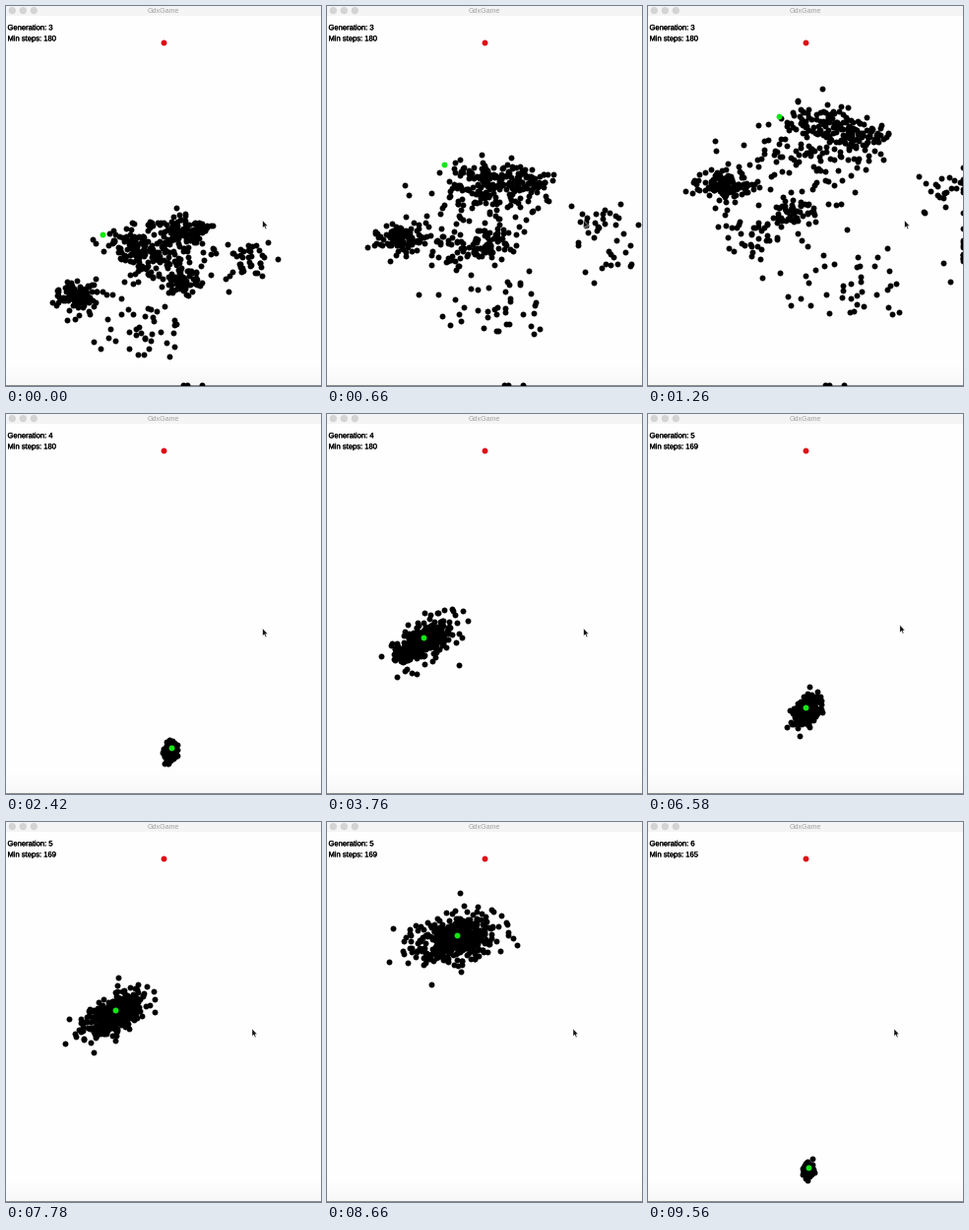
These frames come from a looping animation (320x386 px, 9580 ms). A matplotlib script:

```python
import numpy as np
import matplotlib.pyplot as plt
import matplotlib.patheffects as pe
from matplotlib.animation import FuncAnimation
from matplotlib.patches import Circle, Polygon, Rectangle

W, H, DPI = 320, 386, 100
STEP, FRAMES = 20, 479
START, GOAL = (160, 360), (160, 37)
PX = 72 / DPI


def spline(rows):
    """Smooth curve through rows of (time, x, y)."""
    rows = np.array(rows, float)
    t, v = rows[:, 0], rows[:, 1:]
    m = np.gradient(v, t, axis=0)

    def at(x):
        x = np.clip(x, t[0], t[-1])
        i = min(np.searchsorted(t, x, side="right") - 1, len(t) - 2)
        h = t[i + 1] - t[i]
        u = (x - t[i]) / h
        return ((1 + 2 * u) * (1 - u) ** 2 * v[i] + u * (1 - u) ** 2 * h * m[i]
                + u * u * (3 - 2 * u) * v[i + 1] + u * u * (u - 1) * h * m[i + 1])
    return at


# Route of the leading dot, by age of its generation in ms
best = spline([(0, *START), (220, 163, 350.5), (320, 168, 338.5),
               (800, 158, 295), (1610, 98, 232), (1660, 98, 227),
               (1960, 111, 191), (2870, 133, 112), (3300, 156.7, 67.7),
               (3700, 160, 41)])


def in_window(pts):
    return np.clip(pts, (3, 13), (319.5, 384.5))


class Swarm:
    """Mutated copies that drift away from the leading dot as they age."""

    def __init__(self, seed, n=560, strays=()):
        rng = np.random.default_rng(seed)
        self.z = rng.normal(size=(n, 2)) * rng.uniform(.3, 1.6, (n, 1))
        self.phase = rng.uniform(0, 2 * np.pi, (n, 2))
        self.rate = rng.uniform(.001, .003, (n, 2))
        self.strays = np.reshape(strays, (-1, 2))

    def dots(self, age):
        sx = .0068 * age
        sy = 11 * (1 - np.exp(-age / 1000))
        tilt = -.6 * np.sin(np.pi * min(age / 3300, 1))
        zx, zy = (self.z + .2 * np.sin(self.phase + self.rate * age)).T
        cloud = np.column_stack([sx * zx, sy * (tilt * zx + np.sqrt(1 - tilt ** 2) * zy)])
        strays = self.strays * (age / 3300) ** 1.8
        return in_window(best(max(age - 35, 0)) + np.vstack([cloud, strays]))


class Families:
    """Early population: several families, each on its own straight course."""

    # count, size, centre at age 1610, centre at age 2870
    COURSES = [
        (115, 8, 72, 294, 77, 181),
        (80, 9, 183, 228, 212, 132),
        (65, 11, 128, 240, 178, 112),
        (60, 9, 179, 277, 145, 208),
        (110, 20, 162, 250, 165, 152),
        (35, 10, 145, 260, 102, 235),
        (26, 12, 238, 254, 296, 186),
        (14, 9, 250, 265, 335, 250),
        (44, 24, 135, 324, 200, 280),
    ]

    def __init__(self, seed):
        rng = np.random.default_rng(seed)
        rows = np.repeat(self.COURSES, [c[0] for c in self.COURSES], axis=0)
        self.a, self.b = rows[:, 2:4], rows[:, 4:6]
        self.z = rng.normal(size=self.a.shape) * rows[:, 1:2]
        self.phase = rng.uniform(0, 2 * np.pi, self.a.shape)
        self.stuck = [(x, 384.5) for x in (180, 184, 199)]

    def dots(self, age):
        u = (age - 1610) / 1260
        grow = np.array([1.2 + .45 * u, .85 + .15 * u])
        pts = self.a + (self.b - self.a) * u + self.z * grow
        pts += 2.5 * np.sin(self.phase + age * .003)
        return np.vstack([in_window(pts), self.stuck])


# Birth time, number, min steps, population
GENERATIONS = [
    (-1610, 3, 180, Families(3)),
    (2100, 4, 180, Swarm(4, strays=[(32, 71), (125, 86), (-110, 8), (-92, 9), (-57, 56)])),
    (5820, 5, 169, Swarm(5)),
    (9340, 6, 165, Swarm(6)),
]

fig = plt.figure(figsize=(W / DPI, H / DPI), dpi=DPI, facecolor="#fefefe")
ax = fig.add_axes([0, 0, 1, 1])

# Window
shade = np.linspace(.995, .965, 24)[:, None]
ax.imshow(shade, cmap="gray", vmin=0, vmax=1, extent=(0, W, H, 362),
          aspect="auto", zorder=0)
ax.add_patch(Rectangle((0, 0), W, 10, color="#f4f4f4", lw=0))
ax.add_patch(Rectangle((0, 9.6), W, .8, color="#d6d6d6", lw=0))
ax.add_patch(Rectangle((0, 385), W, 1, color="#8c8c8c", lw=0))
for x in (6.3, 17.3, 28.3):
    ax.add_patch(Circle((x, 4.6), 3.3, fc="#d4d4d4", ec="#c6c6c6", lw=.3))
ax.text(160, 7.2, "GdxGame", family="Liberation Sans", size=7.15 * PX,
        color="#a2a2a2", ha="center", va="baseline")


def label(y):
    t = ax.text(1.5, y, "", family="Liberation Sans", size=7.6 * PX,
                color="black", va="baseline")
    t.set_path_effects([pe.withStroke(linewidth=.2, foreground="black")])
    return t


def dot_layer(color, z):
    return ax.scatter([], [], s=(5.9 * PX) ** 2, c=color, lw=0, zorder=z)


gen_text, step_text = label(24.3), label(35.4)
goal, crowd, lead = (dot_layer(c, z) for z, c in
                     enumerate(("#e00a14", "black", "#14e614"), 3))
goal.set_offsets([GOAL])

ARROW = np.array([(0, 0), (0, 7.6), (1.7, 6.1), (2.9, 8.9), (4.1, 8.4),
                  (2.9, 5.7), (5.2, 5.6)])
cursor = Polygon(ARROW, fc="#111111", ec="white", lw=.3, zorder=6)
ax.add_patch(cursor)
mouse = spline([(6400, 260.7, 217.8), (6800, 250, 210)])

ax.set_xlim(0, W)
ax.set_ylim(H, 0)
ax.axis("off")


def update(i):
    now = i * STEP
    k = max(j for j, g in enumerate(GENERATIONS) if g[0] <= now)
    born, number, steps, pop = GENERATIONS[k]
    age = now - born
    if k + 1 < len(GENERATIONS):  # short hold before the next generation
        age = min(age, GENERATIONS[k + 1][0] - born - 40)
    gen_text.set_text(f"Generation: {number}")
    step_text.set_text(f"Min steps: {steps}")
    crowd.set_offsets(pop.dots(age))
    lead.set_offsets([best(age)])
    cursor.set_xy(ARROW + mouse(now))
    return crowd, lead, gen_text, step_text, cursor


anim = FuncAnimation(fig, update, frames=FRAMES, interval=STEP,
                     repeat=True, repeat_delay=0)
plt.show()
```
